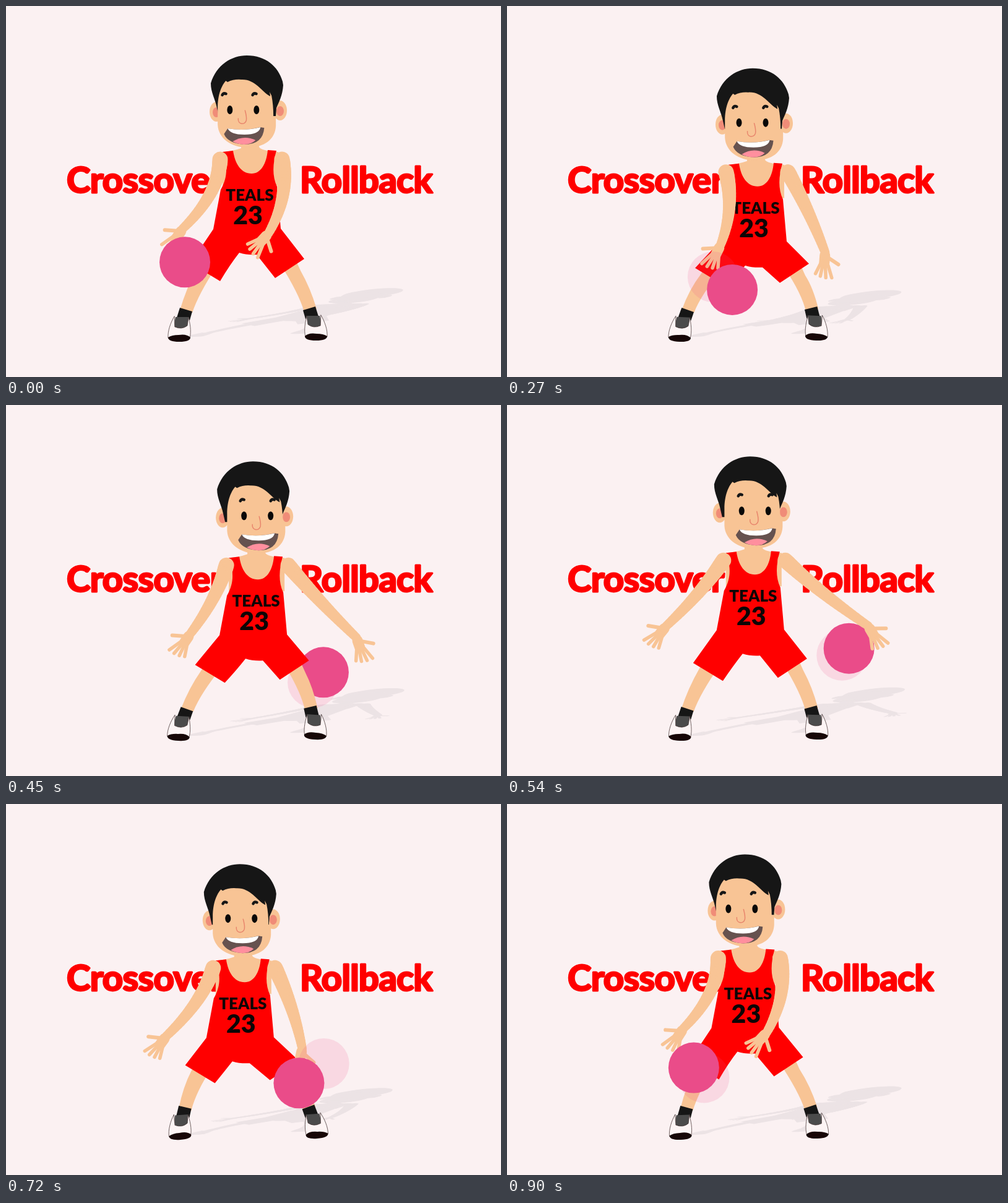
Write an HTML page with a canvas that moves like this. It is 800x600 px and loops after 930 ms.

```html
<!DOCTYPE html>
<html lang="en">
<head>
<meta charset="utf-8">
<title>Crossover</title>
<style>
html, body { margin: 0; width: 100%; height: 100%; overflow: hidden; background: #fbf1f2; }
canvas { display: block; }
</style>
</head>
<body>
<canvas id="stage" width="800" height="600"></canvas>
<script>
const g = document.getElementById('stage').getContext('2d');
const SKIN = '#f8c495', RED = '#ff0000', BLACK = '#161616', PINK = '#ea4c89';
const STEP = 30, STEPS = 30, TURNAROUND = 20; // the ball goes right, then back from step 20
let shade = null; // when set, every shape takes this colour

const easeIn = power => u => u ** power;
const easeOut = power => u => 1 - (1 - u) ** power;
const smooth = u => u * u * (3 - 2 * u);
const hump = u => Math.sin(Math.PI * u) ** 2;

// Turning points; each ease leads to the next point
const ballPath = [
  { at: 4, x: 270, y: 396, ease: easeIn(1.4) },
  { at: 10, x: 436, y: 507, ease: easeOut(1.7) },
  { at: 20.5, x: 574, y: 373, ease: easeIn(1) },
  { at: 25, x: 393, y: 514, ease: easeOut(2.3) },
];
const leftWristPath = [
  { at: 3, x: 257, y: 350, ease: smooth },
  { at: 8, x: 337, y: 366, ease: smooth },
  { at: 20, x: 238, y: 352, ease: easeOut(2) },
  { at: 28, x: 291, y: 362, ease: easeIn(2) },
];

function along(path, step) {
  const i = path.findLastIndex(p => p.at <= step);
  const from = path.at(i), to = path[(i + 1) % path.length];
  const since = (a, b) => (b - a + STEPS) % STEPS;
  const u = from.ease(since(from.at, step) / since(from.at, to.at));
  return [from.x + (to.x - from.x) * u, from.y + (to.y - from.y) * u];
}

function fill(path, color) {
  g.fillStyle = shade || color;
  g.fill(new Path2D(path));
}

function line(path, color, width) {
  g.strokeStyle = shade || color;
  g.lineWidth = width;
  g.stroke(new Path2D(path));
}

function oval(x, y, rx, ry, color) {
  g.fillStyle = shade || color;
  g.beginPath();
  g.ellipse(x, y, rx, ry, 0, 0, 7);
  g.fill();
}

function shifted(x, y, draw) {
  g.save();
  g.translate(x, y);
  draw();
  g.restore();
}

// Drawn around the middle of its sole
function shoe() {
  fill('M1 -52L21 -46L17 -32L-4 -36Z', BLACK);
  fill('M-6 -37H16V-17H-10Z', '#4b4b4b');
  const upper = 'M-8 -38C-14 -28 -19 -14 -18 -3H17C20 -14 17 -28 15 -37L13 -23Q4 -16 -7 -21Z';
  fill(upper, '#fdf4f4');
  line(upper, '#3a2a2a', 0.7);
  fill('M-18 -4Q-12 -8 -1 -8Q12 -10 18 -4Q18 3 0 3Q-18 3 -18 -4Z', '#170707');
}

function legs(hx, hy, sway) {
  const ankle = sway * 0.15;
  fill(`M${318 + hx} ${408 + hy}L${308 + hx} ${425 + hy}Q${291 + hx * 0.6} 458 ${281 + ankle} 492
    L${301 + ankle} 496Q${311 + hx * 0.5} 466 ${341 + hx} ${420 + hy}Z`, SKIN);
  fill(`M${467 + hx} ${408 + hy}L${476 + hx} ${428 + hy}Q${492 + hx * 0.5} 456 ${502 + ankle} 490
    L${482 + ankle} 495Q${474 + hx * 0.5} 466 ${442 + hx} ${415 + hy}Z`, SKIN);
  for (const [x, y, side] of [[280, 540, 1], [501, 538, -1]])
    shifted(x - ankle, y, () => {
      g.rotate(sway * 0.006);
      g.scale(side, 1);
      shoe();
    });
}

function torso(ox, oy) {
  fill('M380 222V230Q366 235 350 236V290H440V236Q412 234 409 228V222Z', SKIN);
  fill(`M350 236L367 234C370 255 380 271 397 271C412 271 421 255 423 233L437 234
    C431 255 430 275 438 292L444 360L${482 + ox} ${409 + oy}L${435 + ox} ${440 + oy}
    L405 402Q390 403 377 399Q362 418 ${346 + ox} ${445 + oy}L${298 + ox} ${416 + oy}
    L335 361L347 297C360 275 357 255 350 236Z`, RED);
  g.fillStyle = shade || '#0c0606';
  g.textAlign = 'center';
  g.font = '900 26px Lato, sans-serif';
  g.fillText('TEALS', 394, 315);
  g.font = '900 41px Lato, sans-serif';
  g.fillText('23', 391, 353);
}

function face(turn) {
  for (const x of [352, 401])
    shifted(x + turn * 1.5, 142, () => line('M-3 2Q-1 -2 3 0', BLACK, 4.5));
  shifted(turn, 0, () => {
    for (const x of [361.5, 404.5]) oval(x, 168, 4.5, 7, '#080808');
    line('M386 169Q389 180 388 185C386 193 374 192 375 182', '#e8856c', 1.5);
    fill('M352 207L358 198Q385 203 410 196L417 197Q415 224 385 224Q358 222 352 207Z', '#66524f');
    fill('M358 198Q385 203 411 196Q409 208 385 208Q362 208 358 198Z', '#fff');
    fill('M366 219Q384 208 403 217Q396 224 384 224Q372 223 366 219Z', '#ff8f9e');
  });
}

function head(turn) {
  for (const [x, y] of [[340, 171], [443, 169]]) {
    oval(x, y, 11, 16, SKIN);
    oval(x, y + 1, 6, 8, '#f08c78');
  }
  fill(`M331 125C340 95 365 80 389 80C420 80 440 98 447 122L448 128
    C447 145 441 155 437 165L436 178H344L341 165C338 150 331 140 331 125Z`, BLACK);
  shifted(turn * 0.4, 0, () => fill(`M355 121C349 128 342 142 342 165V192C343 214 364 229 390 229
    C418 229 435 215 436 194V178H432Q432 160 429 145L426 139L427 146C412 138 403 118 380 119
    Q368 118 358 123Z`, SKIN));
  face(turn);
}

// side is 1 for the arm on the left of the stage, -1 for the other
function arm(sx, sy, wx, wy, bend, angle, side) {
  const cx = (sx + wx) / 2 + bend, cy = (sy + wy) / 2;
  const mix = (a, b, c, u) => a * (1 - u) ** 2 + 2 * b * u * (1 - u) + c * u * u;
  const at = u => `${mix(sx, cx, wx, u)} ${mix(sy, cy, wy, u)}`;
  for (let i = 0, n = 24; i < n; i++)
    line(`M${at(i / n)}L${at((i + 1) / n)}`, SKIN, 25 - 11 * i / n);

  const reach = (turn, length) => {
    const r = (angle + side * turn) * Math.PI / 180;
    return `${wx + length * Math.cos(r)} ${wy + length * Math.sin(r)}`;
  };
  line(`M${reach(0, 5)}L${reach(0, 17)}`, SKIN, 17);
  for (let turn = -20; turn <= 20; turn += 13)
    line(`M${reach(turn * 0.8, 14)}L${reach(turn, 40 + turn / 8)}`, SKIN, 5.5);
  line(`M${reach(15, 6)}L${reach(52, 29)}`, SKIN, 6);
}

function player(step) {
  const right = step < TURNAROUND;
  const u = right ? step / TURNAROUND : (step - TURNAROUND) / (STEPS - TURNAROUND);
  const sway = (right ? 12 : -30) * hump(u ** 1.3);
  const dip = 21 * hump(u ** 0.85);
  const open = right ? u ** 0.85 : (1 - u) ** 2.8; // how far the arms are spread
  const turn = 7 + 7 * Math.cos(2 * Math.PI * (step - 16.5) / STEPS);
  const hx = sway * 0.75, hy = dip * 0.38;

  legs(hx, hy, sway);
  shifted(sway, dip, () => {
    torso(hx - sway, hy - dip);
    head(turn);
    const [lx, ly] = along(leftWristPath, step);
    arm(346, 248, lx, ly, 28 - 20 * open, 124 - (lx - 285) * 0.15, 1);
    const rx = 424 + 179 * open, ry = 368 - 26 * open + 22 * Math.sin(Math.PI * open);
    arm(446, 248, rx, ry, 24 - 40 * open, 133 - 84 * open, -1);
  });
}

function ball(step) {
  const disc = t => {
    const [x, y] = along(ballPath, t);
    oval(x, y, 41, 41 - Math.max(0, y - 500) * 0.2, PINK);
  };
  if (step > 0) {
    g.globalAlpha = 0.15;
    disc(step - 1);
    g.globalAlpha = 1;
  }
  disc(step);
}

function title() {
  g.font = 'bold 58px Lato, sans-serif';
  g.textAlign = 'left';
  g.letterSpacing = '-0.6px';
  g.fillStyle = g.strokeStyle = RED;
  g.lineWidth = 3;
  for (const [word, x] of [['Crossover', 98], ['Rollback', 475]]) {
    g.fillText(word, x, 302);
    g.strokeText(word, x, 302);
  }
  g.letterSpacing = '0px';
}

function frame() {
  const time = performance.now() % 930;
  const step = Math.max(0, Math.floor(time / STEP) - 1); // first pose is held twice as long
  const behind = step >= 10 && step <= 17;

  g.lineCap = g.lineJoin = 'round';
  g.fillStyle = '#fbf1f2';
  g.fillRect(0, 0, 800, 600);
  title();

  // The shadow is the same figure laid flat on the floor
  g.save();
  g.transform(0.75, -0.02, -0.5, 0.165, 365, 450.9);
  shade = '#ece3e5';
  player(step);
  shade = null;
  g.restore();

  if (behind) ball(step);
  player(step);
  if (!behind) ball(step);
  requestAnimationFrame(frame);
}
frame();
</script>
</body>
</html>
```
